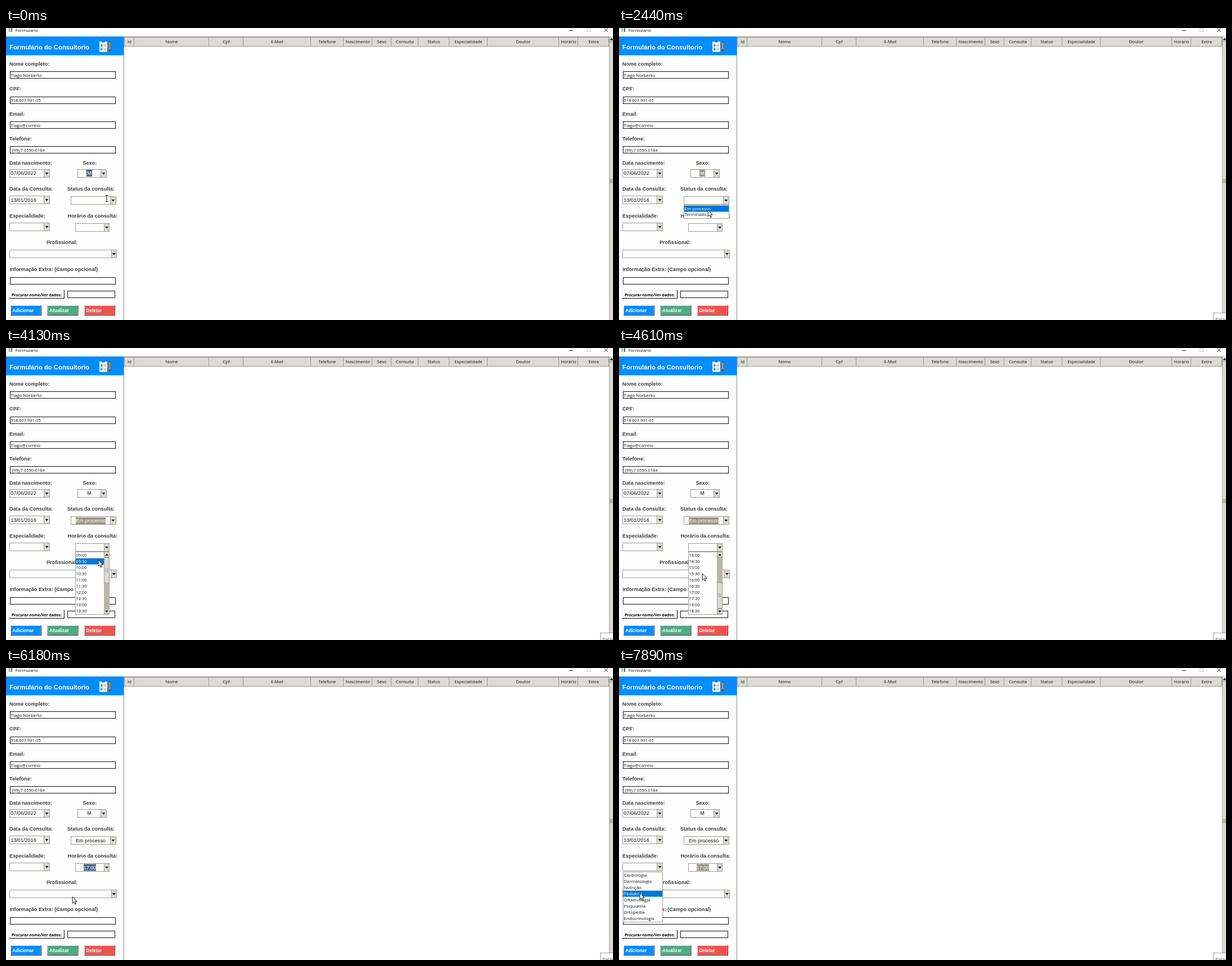
Animation, 1079 px wide and 519 px high, one loop 8000 ms. Source, as an HTML page:

```html
<!DOCTYPE html>
<html lang="pt">
<head>
<meta charset="utf-8">
<title>Formulario</title>
<style>
html, body { margin: 0; width: 100%; height: 100%; overflow: hidden; background: #fefefe; }
svg { display: block; }
text { white-space: pre; }
.ui { font: 7.8px "Open Sans", "Noto Sans", sans-serif; fill: #111; }
.num { font-size: 7.45px; }
.label { font: bold 9.1px "Liberation Sans", Arial, sans-serif; fill: #403d3d; }
.field { font: 9.1px "Liberation Sans", Arial, sans-serif; fill: #111; }
.title { font: bold 11.27px "Liberation Sans", Arial, sans-serif; fill: #fefefe; }
.btn { font: bold 8.2px "Liberation Sans", Arial, sans-serif; fill: #fefefe; }
.search { font: bold 6.8px "Open Sans", "Noto Sans", sans-serif; fill: #000; }
.mid { text-anchor: middle; }
</style>
</head>
<body>
<svg id="stage" width="1079" height="519" viewBox="0 0 1079 519"></svg>
<script>
const LOOP = 8000;
const FACE = '#dcdad5', EDGE = '#9e9a91', TROUGH = '#bab5ab', PICK = '#0078d7';
const SELECTED = '#4a6984', UNFOCUSED = '#9a9688';
const ROW = 10.95;

const rect = (x, y, w, h, fill, extra = '') =>
  `<rect x="${x}" y="${y}" width="${w}" height="${h}" fill="${fill}" ${extra}/>`;
const box = (x, y, r, b, fill, stroke) =>
  rect(x + .5, y + .5, r - x - 1, b - y - 1, fill, `stroke="${stroke}"`);
const text = (x, y, s, cls, extra = '') => `<text x="${x}" y="${y}" class="${cls}" ${extra}>${s}</text>`;
const path = (d, fill, extra = '') => `<path d="${d}" fill="${fill}" ${extra}/>`;
const down = (x, y) => path(`M${x - 3} ${y - 1.5}h6l-3 3.6z`, '#000');
const up = (x, y) => path(`M${x - 3} ${y + 1.5}h6l-3 -3.6z`, '#000');

function combo(x, y, r, button) {
  return box(x, y, r, y + 15, '#fff', EDGE) + box(button, y, r, y + 15, FACE, EDGE) +
    down((button + r) / 2, y + 7.5);
}

function pushButton(x, label, fill) {
  return rect(x, 493, 55, 18, '#1b1b1b') + rect(x, 493, 54, 17, '#e3e3e3') +
    rect(x + .8, 493.8, 52.6, 15.8, fill) + text(x + 3.6, 505, label, 'btn');
}

// Combobox text whose background shows selection and focus
function value(id, x, y, w, s) {
  return `<g id="${id}">${rect(x, y, w, 12, SELECTED)}${text(x + w / 2, y + 9.3, s, 'field mid')}</g>`;
}

function list(id, x, y, r, b, width, items, cls) {
  const rows = items.map((s, i) => text(x + 1.6, y + 9 + i * ROW, s, cls)).join('');
  return `<g id="${id}">${box(x, y, r, b, '#fff', EDGE)}` +
    `${rect(x + 1, y + 1, width, ROW, PICK, 'class="pick"')}${rows}</g>`;
}

function windowFrame() {
  let s = rect(4, 0, 7, 7.5, '#e4ecea') + rect(5, 1, 2, 2, '#4b8f7e') + rect(5, 4.2, 2, 2, '#4b8f7e') +
    rect(9.2, 0, 1.8, 7, '#3f5a66') + text(16.8, 6.9, 'Formulario', 'ui');
  s += path('M1001 4.5h7', 'none', 'stroke="#222"') +
    box(1032, 0, 1039, 7, 'none', '#cfcfcf') +
    path('M1063.3 .5l6.6 6.6m0 -6.6l-6.6 6.6', 'none', 'stroke="#222"');
  return s;
}

function header() {
  let s = rect(0, 15, 209, 33.5, '#038cfc') + text(6, 38.2, 'Formulário do Consultorio', 'title');
  s += rect(166, 24, 14, 18.5, '#eef3f6', 'rx="1"') + rect(170.5, 22.8, 5, 2.6, '#52636e', 'rx="1"');
  for (const y of [31, 37.8]) {
    s += `<circle cx="169.8" cy="${y}" r="2" fill="#4f9f7d"/>` +
      path(`M173.5 ${y - 1}h5m-5 2h4`, 'none', 'stroke="#8fa3b0" stroke-width=".8"');
  }
  return s + rect(182.8, 26, 3.6, 12, '#d98b3a') + rect(182.8, 23, 3.6, 2.4, '#5b5f66') +
    rect(185.4, 26, 1, 12, '#8a5a2c') + path('M182.8 38h3.6l-1.8 4z', '#4a4038');
}

function table() {
  const edges = [211, 228, 361, 422, 542, 600, 651, 685, 733, 788, 856, 983, 1017, 1072];
  const names = ['Id', 'Nome', 'Cpf', 'E-Mail', 'Telefone', 'Nascimento', 'Sexo', 'Consulta',
    'Status', 'Especialidade', 'Doutor', 'Horário', 'Extra'];
  let s = rect(209, 15, 1, 504, '#8c8c8c') + rect(210, 15, 862, 504, '#fff') + rect(210, 15, 862, 1, EDGE);
  names.forEach((name, i) => {
    s += box(edges[i] - 1, 16, edges[i + 1], 33, FACE, EDGE) +
      text((edges[i] + edges[i + 1]) / 2, 27.2, name, 'ui mid');
  });
  s += rect(1072, 15, 7, 504, FACE) + rect(1072, 15, 1, 504, EDGE) + rect(1072, 24, 7, 1, EDGE) +
    up(1076.5, 20) + rect(1073, 268, 6, 8, TROUGH);
  return s;
}

function form() {
  const labels = [[6, 67, 'Nome completo:'], [6, 111.2, 'CPF:'], [6, 155.8, 'Email:'],
    [6, 200.2, 'Telefone:'], [6, 242.6, 'Data nascimento:'], [136.5, 242.6, 'Sexo:'],
    [6, 289, 'Data da Consulta:'], [109, 289, 'Status da consulta:'], [6, 336.6, 'Especialidade:'],
    [109.6, 336.6, 'Horário da consulta:'], [72, 384.4, 'Profissional:'],
    [6.4, 431.6, 'Informação Extra: (Campo opcional)']];
  let s = labels.map(l => text(...l, 'label')).join('');
  for (const y of [77, 122, 166, 210, 443]) s += box(7, y, 195, y + 13, '#fff', '#111');
  s += text(8.6, 86.6, 'Tiago Norberto', 'ui') + text(8.6, 131.2, '518.607.931-05', 'ui num') +
    text(8.6, 175.6, 'Tiago@correio', 'ui') + text(11, 219.8, '(99) 7 0550-0184', 'ui num');
  s += combo(6, 251, 78, 67) + combo(127, 251, 179, 168) + combo(6, 298, 78, 67) +
    combo(115, 299, 196, 185) + combo(6, 346, 78, 67) + combo(123, 347, 184, 174) +
    combo(6, 394, 197, 187);
  s += text(8.2, 261.4, '07/06/2022', 'field') + text(8.2, 309.2, '13/01/2016', 'field');
  s += rect(6, 466, 98, 15, '#111') + rect(6, 466, 96.8, 13.8, '#e3e3e3') +
    rect(7, 467, 95.8, 12.8, '#fdfdfd') + text(10, 476.6, 'Procurar nome/Ver dados:', 'search') +
    box(109, 467, 194, 480, '#fff', '#111');
  s += pushButton(8, 'Adicionar', '#038cfc') + pushButton(73.5, 'Atualizar', '#4fa882') +
    pushButton(139, 'Deletar', '#ef5350');
  return s + value('sex', 143, 252, 10, 'M') + value('status', 124, 301, 53, 'Em processo') +
    value('hour', 138, 348.5, 22, '17:00');
}

function popups() {
  const bar = rect(174, 363, 9.5, 110, TROUGH) + box(174, 362, 184, 372, FACE, EDGE) +
    box(174, 463, 184, 473, FACE, EDGE) + up(179, 367.5) + down(179, 468) +
    `<g id="thumb">${box(174, 372, 184, 418, FACE, EDGE)}` +
    path('M176 392.5h6m-6 2.5h6m-6 2.5h6', 'none', `stroke="${EDGE}"`) + '</g>';
  const specialties = ['Cardiologia', 'Dermatologia', 'Nutrição', 'Pediatria', 'Oftalmologia',
    'Psiquiatria', 'Ortopedia', 'Endocrinologia'];
  return list('statusList', 115, 314.5, 196, 339, 79, ['Em processo', 'Terminado'], 'ui') +
    list('hourList', 123, 362, 184, 474, 50, Array(10).fill(''), 'ui num')
      .replace(/<\/g>$/, bar + '</g>') +
    list('areaList', 7, 362, 78, 452, 69, specialties, 'ui') +
    `<g id="tip">${box(1056, 506, 1090, 530, '#fff', '#9a9a9a')}${text(1060.5, 520.4, 'Parar', 'ui', 'fill-opacity=".75"')}</g>`;
}

const pointers =
  `<g id="arrow">${path('M0 0V11.6L2.7 9.1L4.6 13.3L6.4 12.5L4.6 8.4H8.2Z', '#fff', 'stroke="#000" stroke-width=".9"')}</g>` +
  `<g id="beam">${path('M-2.5 -5.5h5M0 -5.5v11M-2.5 5.5h5', 'none', 'stroke="#222" stroke-width="1.1"')}</g>`;

const $ = id => document.getElementById(id);
$('stage').innerHTML = windowFrame() + header() + table() + form() + popups() + pointers;

// Pointer moves: first change, last change, x, y
const moves = [
  [70, 230, 156, 260], [260, 460, 190, 309],
  [920, 1340, 165, 320], [1420, 1680, 160, 322],
  [1750, 2060, 160, 328], [2130, 2510, 158, 323],
  [2980, 3450, 180, 352], [3930, 4270, 148, 401],
  [4880, 5500, 139, 428], [5570, 5640, 138, 430],
  [5910, 6590, 72, 352], [6990, 7750, 36, 397],
  [7820, 7820, 36, 398], [7890, 7890, 37, 400]
];

function pointerAt(t) {
  let x = 179, y = 303;
  for (const [start, end, toX, toY] of moves) {
    if (t < start) break;
    const n = Math.round((end - start) / 70) + 1;
    const step = (end - start) / (n - 1) || 1;
    const u = Math.min(1, (Math.floor((t - start + .5) / step) + 1) / n);
    const e = u * u * (3 - 2 * u);
    x += (toX - x) * e;
    y += (toY - y) * e;
  }
  return [x, y];
}

const show = (id, on) => $(id).style.display = on ? '' : 'none';
const rowAt = (y, top, count) => Math.max(0, Math.min(count - 1, Math.floor((y - top) / ROW)));
const clock = i => `${String(9 + (i >> 1)).padStart(2, '0')}:${i % 2 ? '30' : '00'}`;

function setValue(id, t, from, blur, plain) {
  const [back, label] = $(id).children;
  show(id, t >= from);
  back.style.fill = t < blur ? SELECTED : UNFOCUSED;
  back.style.display = t < plain ? '' : 'none';
  label.style.fill = t < plain ? '#fff' : '';
}

function highlight(id, top, row) {
  const pick = $(id).querySelector('.pick');
  pick.setAttribute('y', top + row * ROW);
  pick.style.display = row < 0 ? 'none' : '';
  $(id).querySelectorAll('text').forEach((label, i) => label.style.fill = i === row ? '#fff' : '');
}

function render(t) {
  const [x, y] = pointerAt(t);
  const isBeam = t < 390;
  show('beam', isBeam);
  show('arrow', !isBeam);
  $(isBeam ? 'beam' : 'arrow').setAttribute('transform', `translate(${x} ${y})`);

  setValue('sex', t, 0, 660, 2710);
  setValue('status', t, 2710, 3580, 5840);
  setValue('hour', t, 5840, 6720, LOOP);

  show('statusList', t >= 660 && t < 2710);
  show('hourList', t >= 3580 && t < 5840);
  show('areaList', t >= 6720);
  show('tip', t >= 1200);

  highlight('statusList', 315.7, rowAt(y, 315.7, 2));
  highlight('areaList', 362.8, rowAt(y, 362.8, 8));

  const scroll = t < 4340 ? 0 : t < 4480 ? 4 : t < 4610 ? 8 : 10;
  const row = rowAt(y, 362.8, 10);
  $('hourList').querySelectorAll('text').forEach((label, i) => label.textContent = clock(i + scroll));
  highlight('hourList', 362.8, t < 4880 ? row - scroll : row);
  $('thumb').setAttribute('transform', `translate(0 ${scroll * 4.5})`);
}

function tick() {
  render(performance.now() % LOOP);
  requestAnimationFrame(tick);
}
tick();
</script>
</body>
</html>
```
